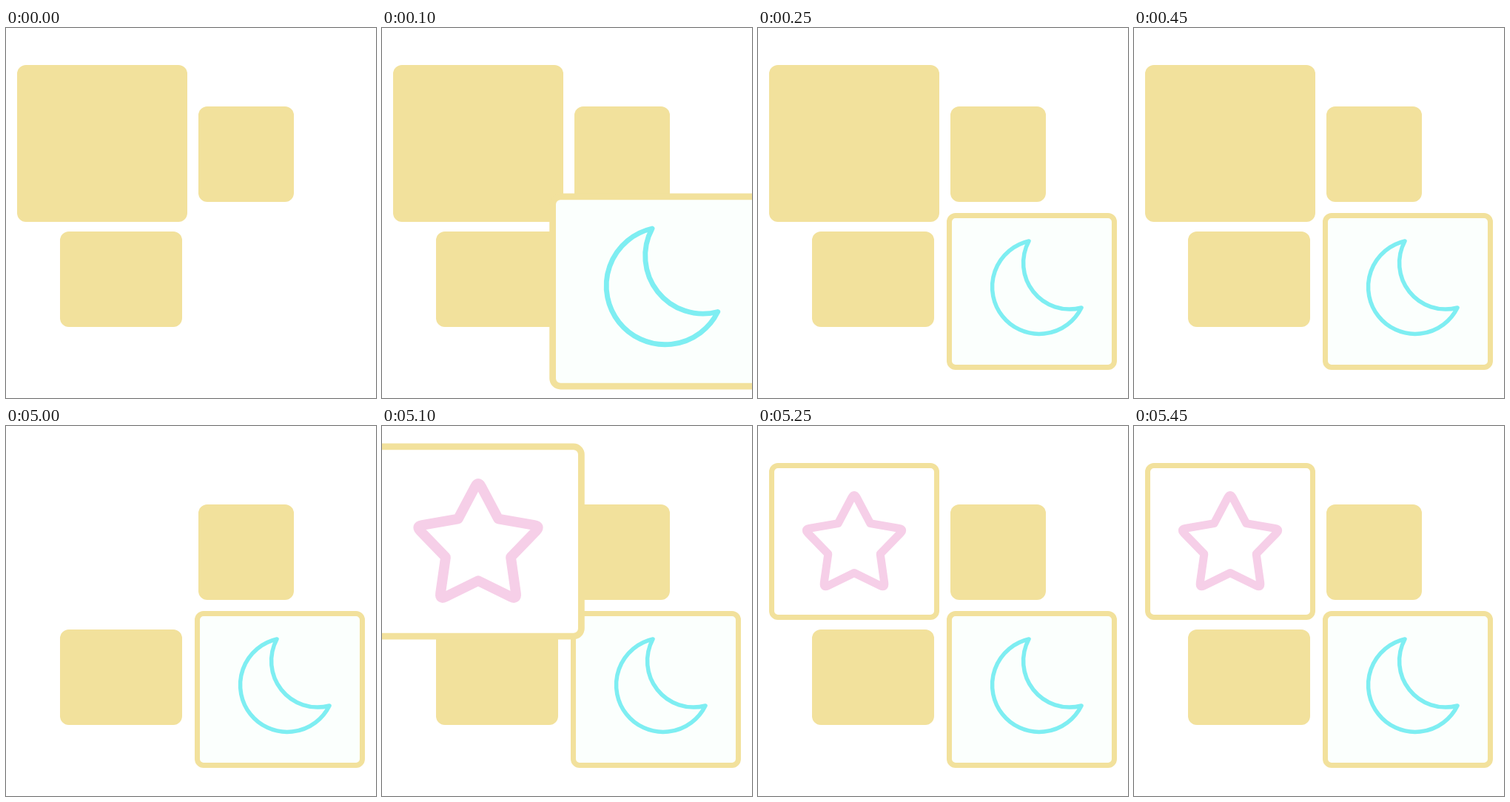
An HTML page for the animation above (8000 ms loop, 500x500 px).

```html
<!DOCTYPE html>
<html>
<head>
<meta charset="utf-8">
<title>Memory cards</title>
<style>
  html, body { margin: 0; height: 100%; overflow: hidden; background: #fff; }
  svg { display: block; width: 100%; height: 100%; }
  .back { fill: #f2e19c; }
  .front { stroke: #f2e19c; stroke-width: 7; }
  .icon { fill: none; stroke-linejoin: round; }
</style>
</head>
<body>
<svg viewBox="0 0 500 500">
  <rect class="back" x="260" y="106" width="129" height="129" rx="12"/>
  <rect class="back" x="73" y="275" width="165" height="129" rx="12"/>
  <rect class="back" id="cover" x="15" y="50" width="230" height="212" rx="12"/>
  <!-- Cards are drawn around their own centre -->
  <g id="moon">
    <rect class="front" x="-111.5" y="-102.5" width="223" height="205" rx="8.5" fill="#fbfffd"/>
    <path class="icon" stroke="#7eeef2" stroke-width="5.5"
      d="M-4 -68A63.5 63.5 0 1 0 67 22A62.5 62.5 0 0 1 -4 -68Z"/>
  </g>
  <g id="star">
    <rect class="front" x="-111.5" y="-102.5" width="223" height="205" rx="8.5" fill="#fff"/>
    <path class="icon" id="starPath" stroke="#f6cfe8" stroke-width="11"/>
  </g>
</svg>
<script>
const LOOP = 8000, STEP = 50, FLIP = 5000;
const el = id => document.getElementById(id);

// Five-pointed star with softened tips
function starPath(cy, outer, inner, cut) {
  const at = (r, i) => [r * Math.sin(i * Math.PI / 5), cy - r * Math.cos(i * Math.PI / 5)];
  let d = '';
  for (let i = 0; i < 10; i += 2) {
    const tip = at(outer, i), before = at(inner, i - 1), after = at(inner, i + 1);
    const toward = p => {
      const k = cut / Math.hypot(p[0] - tip[0], p[1] - tip[1]);
      return tip.map((v, n) => v + (p[n] - v) * k);
    };
    d += `${i ? 'L' : 'M'}${before}L${toward(before)}Q${tip} ${toward(after)}`;
  }
  return d + 'Z';
}

// Pop: grow past full size in 100 ms, settle by 150 ms
function pop(t) {
  if (t <= 0) return 0;
  if (t <= 100) return 1.25 * t / 100;
  return Math.max(1, 1.25 - 0.25 * (t - 100) / 50);
}

function place(id, x, y, scale) {
  el(id).setAttribute('transform', `translate(${x} ${y}) scale(${scale})`);
  el(id).style.display = scale ? '' : 'none';
}

function draw(now) {
  const t = Math.floor(now % LOOP / STEP) * STEP;
  place('moon', 370, 356, pop(t));
  place('star', 130, 156, pop(t - FLIP));
  el('cover').style.display = t < FLIP ? '' : 'none';
}

el('starPath').setAttribute('d', starPath(5.5, 71, 37, 7));
let start;
function tick(now) {
  start ??= now;
  draw(now - start);
  requestAnimationFrame(tick);
}
draw(0);
requestAnimationFrame(tick);
</script>
</body>
</html>
```
